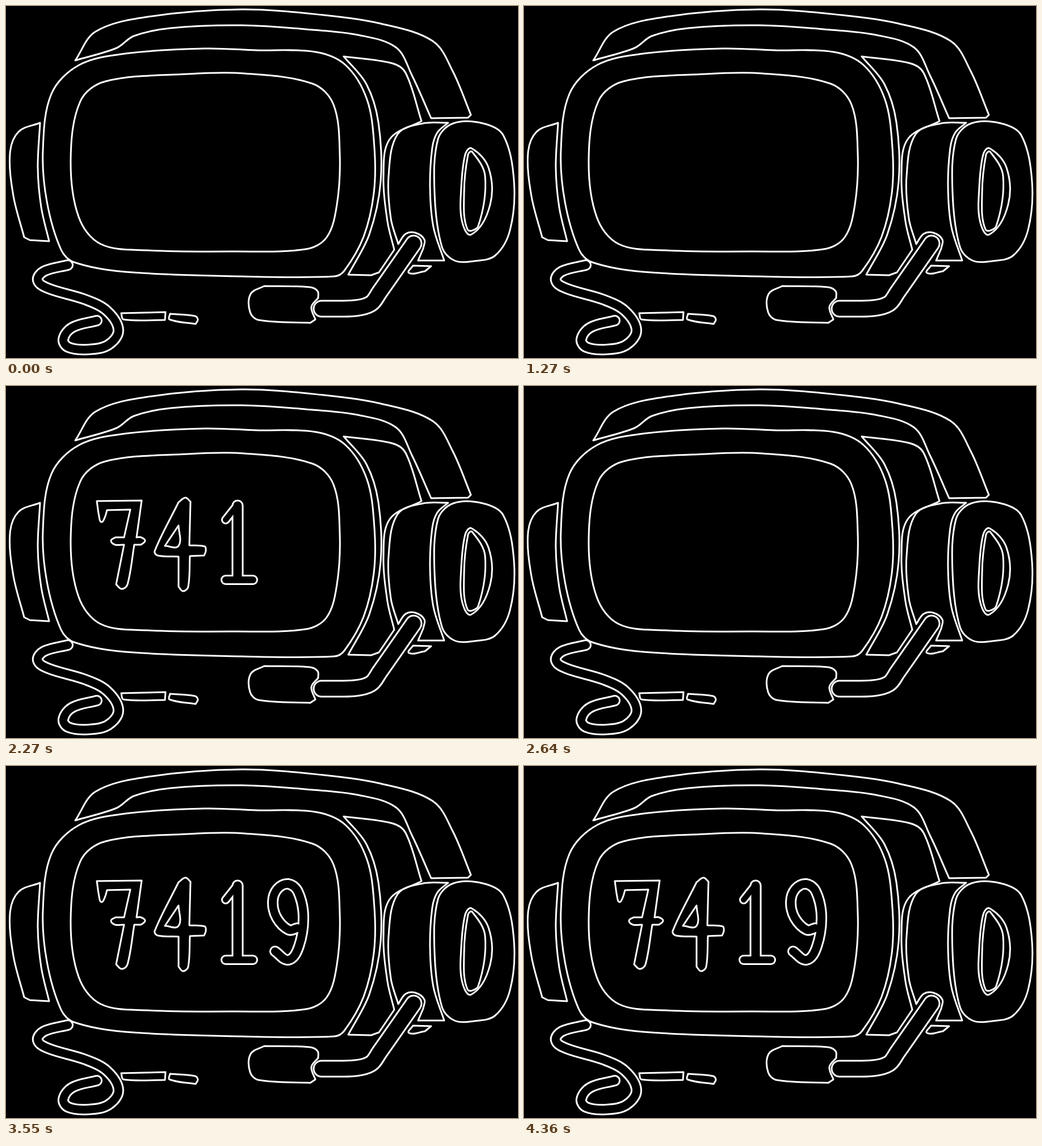
Recreate the animation shown at these times as an HTML page. Size 902 by 621 pixels, loop 5350 ms.

```html
<!DOCTYPE html>
<html lang="en">
<head>
<meta charset="utf-8">
<title>Pager headset</title>
<style>
  html, body { margin: 0; width: 100%; height: 100%; overflow: hidden; background: #000; }
  svg { display: block; width: 100%; height: 100%; }
  path { fill: none; stroke: #fff; stroke-width: 3; stroke-linejoin: round; stroke-linecap: round; }
</style>
</head>
<body>
<svg viewBox="0 0 902 621"></svg>
<script>
const LOOP = 5350;
const STEP = 4360 / 48;
const LINE = 3;
const svg = document.querySelector("svg");

function add(parent, tag, attributes = {}) {
  const node = document.createElementNS("http://www.w3.org/2000/svg", tag);
  for (const name in attributes) node.setAttribute(name, attributes[name]);
  return parent.appendChild(node);
}

const parse = text => text.trim().split(/\s+/).map(pair => pair.split(",").map(Number));

// Smooth curve through the points; each tangent is parallel to the chord of its neighbours.
function curveTo(points, closed) {
  const n = points.length;
  const at = i => closed ? points[(i + n) % n] : points[Math.min(Math.max(i, 0), n - 1)];
  const handle = (i, reach) => {
    const [ax, ay] = at(i - 1), [bx, by] = at(i + 1), [x, y] = at(i);
    const k = reach / Math.hypot(bx - ax, by - ay);
    return [x + (bx - ax) * k, y + (by - ay) * k];
  };
  let d = "";
  for (let i = 0; i < (closed ? n : n - 1); i++) {
    const [x, y] = at(i), [nx, ny] = at(i + 1);
    const reach = Math.hypot(nx - x, ny - y) / 3;
    d += `C${handle(i, reach)} ${handle(i + 1, -reach)} ${at(i + 1)}`;
  }
  return d;
}

// Closed outline; a slash makes the point before it a corner.
function outline(parent, text) {
  const runs = text.split("/").map(parse);
  const start = runs[0][0];
  let d = "M" + start;
  if (runs.length === 1) {
    d += curveTo(runs[0], true);
  } else {
    runs.forEach((run, i) => {
      const from = i ? [runs[i - 1].at(-1)] : [];
      const to = i === runs.length - 1 ? [start] : [];
      d += curveTo([...from, ...run, ...to], false);
    });
  }
  add(parent, "path", { d: d + "Z" });
}

// Hollow rounded strokes that merge where they overlap.
function tube(parent, ...strokes) {
  for (const [color, extra] of [["#fff", LINE], ["#000", -LINE]]) {
    for (const [width, text] of strokes) {
      const points = parse(text);
      const d = "M" + points[0] + curveTo(points, false);
      add(parent, "path", { d, style: `stroke:${color};stroke-width:${width + extra}` });
    }
  }
}

function drawCable(g) {
  tube(g, [17, "109,457 67,468 56,484 74,498 140,518 178,538 198,572 180,598 145,606 110,602 101,588 117,567 160,555"]);
  outline(g, "203,542 / 281,540 / 280,554 / 207,553");
  outline(g, "289,543 / 333,547 338,553 334,561 / 288,553");
}

function drawBody(g) {
  outline(g, `129,104 210,84 350,75 440,78 545,81 598,104 636,165 649,250 648,330 630,407
    596,467 578,477 415,477 210,469 120,452 97,430 72,345 65,255 80,155`);
  outline(g, `175,133 320,120 420,119 540,137 577,174 588,260 583,350 565,408 528,429
    400,433 250,431 167,420 128,372 114,270 131,168`);
}

function drawBand(g) {
  outline(g, `122,96 158,45 250,19 415,6 560,16 660,31 752,62 787,115 819,192 / 814,197 / 749,198 /
    715,122 687,73 620,51 540,42 415,34 290,39 225,53 195,74`);
  outline(g, `595,89 680,101 704,118 732,203 / 676,235 665,300 672,380 684,430 / 657,470 / 643,475 /
    603,474 / 640,403 660,310 656,205 635,138`);
}

function drawCups(g) {
  outline(g, "60,206 22,222 7,260 13,335 32,408 / 42,413 / 76,415 / 62,355 56,285");
  outline(g, `779,206 735,207 690,226 674,300 678,375 691,420 / 704,402 721,400 737,412 735,428 /
    726,449 / 772,449 / 753,390 747,320 751,250 760,223`);
  outline(g, "788,207 840,207 876,228 895,310 888,395 862,440 825,450 790,449 768,425 755,330 761,235");
  outline(g, "820,251 850,285 853,350 820,403 803,378 802,320 809,262");
  outline(g, "821,257 844,300 832,388 813,394 807,330 814,262");
}

function drawMicrophone(g) {
  outline(g, "717,458 / 749,459 / 738,468 / 710,471");
  outline(g, "455,494 535,496 549,503 550,515 / 538,531 545,553 / 536,559 / 445,554 430,540 431,508");
  tube(g, [28, "556,534 615,533 643,525 658,505 718,419"]);
}

function drawSeven(g) {
  outline(g, `160,203 / 239,202 / 230,267 / 238,267 245,273 238,280 / 226,280 / 214,350 204,358 194,350 /
    208,280 / 192,280 185,273 193,267 / 208,267 / 219,218 / 178,219 / 174,232 168,240 164,230`);
}

function drawFour(g) {
  outline(g, `304,205 316,197 325,204 / 323,281 / 350,283 352,291 349,299 / 324,300 /
    321,354 312,362 304,354 / 304,301 / 267,299 262,291`);
  outline(g, "304,246 / 280,282 / 304,282");
}

function drawOne(g) {
  tube(g, [18, "408,211 408,340"], [13, "387,236 406,212"], [15, "387,342 435,342"]);
}

function drawNine(g) {
  tube(g, [17, "513,286 498,289 477,268 470,240 478,217 497,208 514,221 524,265 516,318 498,342 474,327"]);
}

for (const draw of [drawCable, drawBody, drawBand, drawCups, drawMicrophone]) draw(svg);

const digits = [drawSeven, drawFour, drawOne, drawNine].map(draw => {
  const group = add(svg, "g");
  draw(group);
  return group;
});

// Digits are typed in one by one, then blink twice and stay.
function visibleDigits(step) {
  if (step < 20) return 0;
  if (step < 28) return Math.floor((step - 18) / 2);
  if (step < 37) return step >= 31 && step < 34 ? 4 : 0;
  return 4;
}

function render(time) {
  const count = visibleDigits((time % LOOP + 1) / STEP);
  digits.forEach((digit, i) => digit.setAttribute("visibility", i < count ? "visible" : "hidden"));
}

const start = performance.now();
function tick() {
  render(performance.now() - start);
  requestAnimationFrame(tick);
}
tick();
</script>
</body>
</html>
```
